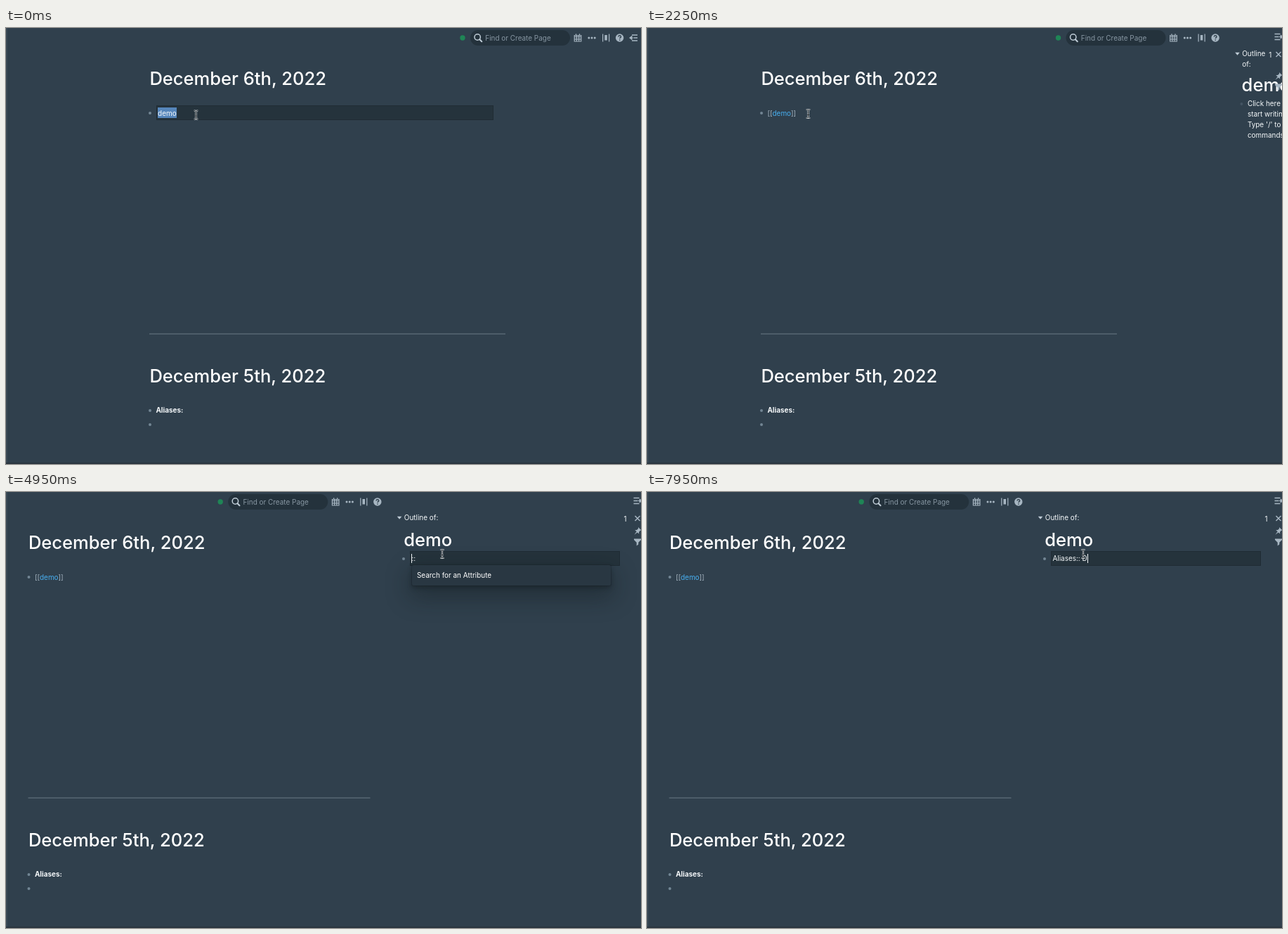
An HTML page for the animation above (8000 ms loop, 904 by 620 pixels).

```html
<!DOCTYPE html>
<html lang="en">
<head>
<meta charset="utf-8">
<title>Daily notes</title>
<style>
  html, body { margin: 0; width: 100%; height: 100%; overflow: hidden; background: #30404d; }
  #stage {
    position: absolute; left: 0; top: 0; width: 904px; height: 620px; overflow: hidden;
    background: #30404d; color: #f5f8fa;
    font: 400 9.95px/20px Inter, "Open Sans", sans-serif;
    font-optical-sizing: none; white-space: pre;
  }
  #stage::before { content: ""; position: absolute; inset: 0; border: solid #3a4955; border-width: 0 0 0 2px; }
  #stage::after { content: ""; position: absolute; left: 0; right: 0; bottom: 0; height: 2px; background: #2a353f; }
  #main, #bar, #side, #panel, #outline, svg { position: absolute; left: 0; top: 0; }
  svg { overflow: visible; }
  .t, .box, .menu, .dot, #rule { position: absolute; }
  h1 { margin: 0; font-size: 25.55px; line-height: 40px; font-weight: 500; color: #fff; }
  .dot { width: 4px; height: 4px; border-radius: 50%; background: #738694; }
  .box {
    box-sizing: border-box; height: 21px; line-height: 21px; padding-left: 2.6px;
    background: #25333c; box-shadow: inset 0 0 0 1px rgba(16, 22, 26, .22);
  }
  .box b { font-weight: 400; padding: 1.5px 0; background: #5686bb; }
  .box i { position: absolute; width: 1px; height: 13px; margin-top: 4px; background: #f5f8fa; }
  .menu {
    box-sizing: border-box; width: 283.6px; padding: 3.5px 7.3px 2.1px; border-radius: 2px; line-height: 23.5px;
    color: #fff; background: #293742;
    box-shadow: 0 0 0 1px rgba(16, 22, 26, .2), 0 3px 6px rgba(16, 22, 26, .4), 0 13px 33px 4px rgba(16, 22, 26, .4);
  }
  #link { color: #a7b6c2; }
  #link span { color: #48aff0; }
  #link.hover span { text-decoration: underline; }
  #rule { left: 204px; top: 434px; height: 1px; background: #6b7a86; transform: translateY(.5px); }
  #search { left: 661px; top: 3px; width: 142px; height: 22px; border-radius: 11px; background: #24323c; }
</style>
</head>
<body>
<div id="stage">
  <div id="main">
    <h1 class="t" style="left:204.4px;top:52px">December 6th, 2022</h1>
    <div class="dot" style="left:203px;top:119px"></div>
    <div class="t" id="link" style="left:213.4px;top:110.5px">[[<span>demo</span>]]</div>
    <div class="box" id="edit" style="left:213.5px;top:110px;width:480.5px"></div>
    <div id="rule"></div>
    <h1 class="t" style="left:204.4px;top:474.5px">December 5th, 2022</h1>
    <div class="dot" style="left:203px;top:542px"></div>
    <div class="t" style="left:213.4px;top:533px;font-weight:700">Aliases:</div>
    <div class="dot" style="left:203px;top:561.5px"></div>
    <div class="menu" id="pages" style="left:223.2px;top:129.5px"></div>
  </div>

  <div id="bar">
    <div class="t" id="search"></div>
    <div class="t" style="left:682.3px;top:4px;color:#8796a2">Find or Create Page</div>
    <svg width="904" height="28" fill="none" stroke="#a7b6c2">
      <circle cx="650" cy="14" r="3.7" fill="#1f8556" stroke="none"/>
      <g stroke="#bfccd6" stroke-width="1.5"><circle cx="671.2" cy="13" r="4.2"/><path d="M674.3 16.2l3 3" stroke-width="2" stroke-linecap="round"/></g>
      <path d="M809.2 10.5h9.6v8.5h-9.6zM809 12.500h10M809 15.800h10M812.400 11v8M815.600 11v8M811.500 8.300v2M816.500 8.300v2" stroke-width="1.15"/>
      <g fill="#a7b6c2" stroke="none">
        <circle cx="829.8" cy="14" r="1.5"/><circle cx="834" cy="14" r="1.5"/><circle cx="838.2" cy="14" r="1.5"/>
        <path d="M849 8.5h1.2v11H849zM858 8.5h1.2v11H858zM852.3 10h3.5v7.5h-3.5z"/>
        <circle cx="873.6" cy="14" r="5.7"/>
      </g>
      <path d="M871.8 12.4c0-2.2 3.7-2.2 3.7 0 0 1.2-1.8 1.3-1.8 2.7M873.7 16.3v1.4" stroke="#30404d" stroke-width="1.4"/>
      <g id="opener"><path d="M891 10h8M893.5 14h5.5M891 18h8" stroke-width="1.4"/><path d="M887.5 14l3.6-2.7v5.4zM890 14h3" fill="#a7b6c2" stroke-width=".8"/></g>
    </svg>
  </div>

  <div id="panel">
    <div id="side">
      <svg width="1" height="1"><path d="M556.8 34.8h6.6l-3.3 4z" fill="#bfccd6"/></svg>
      <div class="t" id="label" style="left:566.8px;top:29px;line-height:15px"></div>
      <div id="outline">
        <h1 class="t" style="left:566.2px;top:48px">demo</h1>
        <div class="dot" id="bullet" style="left:564px;top:93px"></div>
        <div class="t" id="hint" style="left:574.5px;top:87px;line-height:15px"></div>
        <div class="box" id="attr" style="left:574.8px;top:84px;width:299.2px"></div>
        <div class="menu" id="attrs" style="left:577.6px;top:103.5px"></div>
      </div>
    </div>
    <div class="t" id="count" style="top:27.5px">1</div>
    <svg width="904" height="100" fill="none" stroke="#a7b6c2">
      <path d="M893.5 8.5h8M893.5 12.5h6M893.5 16.5h8" stroke-width="1.3"/>
      <path d="M900 12.5h2M902 10l3.5 2.5-3.5 2.5z" fill="#a7b6c2"/>
      <path d="M895.5 34l7 7m0-7l-7 7" stroke-width="1.5"/>
      <g id="tools" fill="#a7b6c2" stroke="none">
        <path d="M900 50l4.5 4.5-1.5.3-2 2.2.2 2.6-2.4-2.2-4.3 3.3 3.2-4.4-2.4-2.3 2.7.1 2.1-2z"/>
        <path d="M894 66.5h10v1.5l-3.7 3.8v2.6l-2.6 2v-4.6L894 68z"/>
      </g>
    </svg>
  </div>

  <svg id="cursor" width="1" height="1" stroke-linejoin="round">
    <defs><path id="caret" d="M-2.8-6Q0-6 0-4.800V4.800Q0 6-2.800 6M2.800-6Q0-6 0-4.800M0 4.800Q0 6 2.800 6M-1.500 1.500h3"/></defs>
    <g id="beam" fill="none">
      <use href="#caret" stroke="#dde3e7" stroke-width="2.2"/>
      <use href="#caret" stroke="#151a1e" stroke-width=".9"/>
    </g>
    <path id="arrow" d="M.5.5v10.3l2.4-2.2 1.7 3.8 1.8-.8-1.7-3.7h3.2z" fill="#111" stroke="#fff"/>
    <path id="hand" d="M-2-5q1-1.2 2 0v4l4 1q1.5.4 1.3 2L4.5 7h-6l-3-4.5q-.3-1.8 1.3-1l1.2 1z" fill="#111" stroke="#fff" stroke-width=".9"/>
  </svg>
</div>

<script>
const LOOP = 8000, STEP = 150;
const $ = id => document.getElementById(id);
const latest = (rows, t) => rows.filter(r => r[0] <= t).pop();
const show = (id, on) => { $(id).style.display = on ? "" : "none"; };
const move = (id, x, y = 0) => { $(id).style.transform = `translate(${x}px, ${y}px)`; };

const ATTRIBUTES = ["Aliases", "Action", "Agenda", "Area", "Attendees", "Author", "Archive", "Assigned"];

// time, text before / inside / after the selection, menu
const pageEdits = [
  [0, "", "demo", "", []],
  [150, "[", "demo", "]", []],
  [300, "[[", "demo", "]]", ["Search for a Page"]],
  [750, "[[", "demo", "]]", ["demo", "advanced search demo"]],
  [1350]
];

// time, text before / after the caret, caret shown, menu
const attrEdits = [
  [0],
  [3450, "", "", true, []],
  [4050, "", "", false, []],
  [4350, ":", "", true, []],
  [4800, "::", "", true, ["Search for an Attribute"]],
  [4950, "", "::", true, ["Search for an Attribute"]],
  [5400, "A", "::", true, ATTRIBUTES],
  [5700, "Ali", "::", true, ["Aliases"]],
  [6300, "Alia", "::", true, ["Aliases"]],
  [6450, "Alias", "::", true, ["Aliases"]],
  [6750, "Aliases", "::", true, []],
  [6900, "Aliases::", "", true, []],
  [7350, "Aliases::", "", false, []],
  [7650, "Aliases:: ", "", true, []],
  [7950, "Aliases:: D", "", true, []]
];

// time, shape, position
const pointer = [
  [0, "beam", 270.5, 123.5],
  [900, "arrow", 240, 140],
  [1050, "arrow", 192, 168],
  [1200, "arrow", 169.8, 177.5],
  [1500, "arrow", 192, 150],
  [1650, "arrow", 219, 127],
  [1800, "hand", 229, 122],
  [2250, "beam", 229.5, 122]
];

// time, panel width, page shift, rule width
const layouts = [[0, 0, 0, 507], [2250, 64.5, 42, 507], [2400, 344.8, 172.5, 487]];

function fillMenu(id, items = []) {
  show(id, items.length);
  $(id).innerHTML = items.map(s => `<div>${s}</div>`).join("");
}

function drawLayout(t) {
  const [, width, shift, rule] = latest(layouts, t);
  const open = width > 0, narrow = width < 100;
  move("main", -shift);
  move("bar", -width);
  $("rule").style.width = rule + "px";
  show("opener", !open);
  show("panel", open);
  move("side", narrow ? 280.4 : 0);
  move("outline", 0, narrow ? 13 : 0);
  move("tools", 0, narrow ? 13 : 0);
  $("count").style.left = (narrow ? 885.2 : 879.6) + "px";
  $("label").textContent = narrow ? "Outline\nof:" : "Outline of:";
  $("hint").textContent = ["Click here to", "start writing.", "Type '/' to see", "commands."].join(narrow ? "\n" : " ");
}

function drawPage(t) {
  const [, before, picked, after, menu] = latest(pageEdits, t);
  const editing = picked !== undefined;
  show("edit", editing);
  show("link", !editing);
  if (editing) $("edit").innerHTML = `${before}<b>${picked}</b>${after}`;
  fillMenu("pages", menu);
}

function drawAttribute(t) {
  const [, before, after, caret, menu] = latest(attrEdits, t);
  const editing = before !== undefined;
  show("attr", editing);
  show("hint", !editing);
  $("bullet").style.opacity = editing ? 1 : .3;
  if (editing) $("attr").innerHTML = before + (caret ? "<i></i>" : "") + after;
  fillMenu("attrs", menu);
}

function drawPointer(t) {
  let [, shape, x, y] = latest(pointer, t);
  if (t >= 2700) {
    const p = Math.min(1, (t - 2550) / 750), e = p * p * (3 - 2 * p);
    x += (621 - x) * e;
    y += (88 - y) * e;
  }
  for (const id of ["beam", "arrow", "hand"]) show(id, id === shape);
  $("link").className = shape === "hand" ? "t hover" : "t";
  move("cursor", x, y);
}

const start = performance.now();
let drawn = -1;
function tick() {
  const t = Math.floor((performance.now() - start) % LOOP / STEP) * STEP;
  if (t !== drawn) {
    drawn = t;
    drawLayout(t);
    drawPage(t);
    drawAttribute(t);
    drawPointer(t);
  }
  requestAnimationFrame(tick);
}
tick();
</script>
</body>
</html>
```
